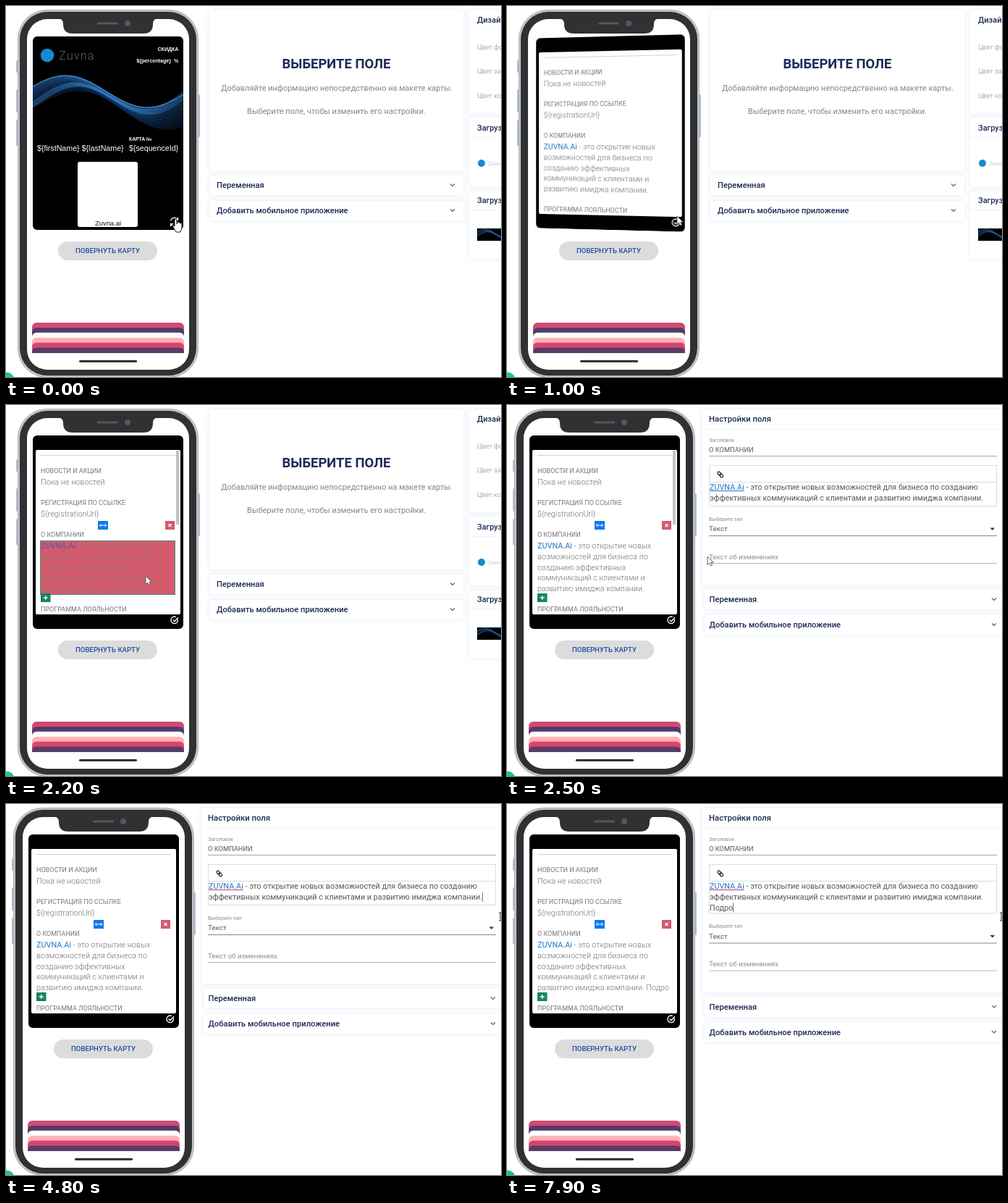
Animation of 684 by 512 pixels, one loop 8 s. Source, as an HTML page:

```html
<!DOCTYPE html>
<html lang="ru">
<head>
<meta charset="utf-8">
<title>Редактор карты</title>
<style>
html, body { margin: 0; width: 100%; height: 100%; overflow: hidden; background: #fff; }
#stage { position: relative; width: 684px; height: 512px; overflow: hidden; background: #fff; }
#stage svg { position: absolute; left: 0; top: 0; display: block; }
#phone { position: absolute; left: 0; top: 0; width: 684px; height: 512px; }
#scene { position: absolute; left: 37px; top: 42px; width: 208px; height: 267px; perspective: 800px; }
#flip { position: absolute; width: 208px; height: 267px; transform-style: preserve-3d; }
.face { position: absolute; width: 208px; height: 267px; backface-visibility: hidden; }
#back { transform: rotateY(180deg); }
text { white-space: pre; font-family: Roboto, "Open Sans", sans-serif; }
.arial { font-family: "Liberation Sans", Arial, sans-serif; }
.panel { fill: #fff; filter: drop-shadow(0 0 3px #e3e8f5); }
</style>
</head>
<body>
<div id="stage"></div>
<script>
const LOOP = 8000;
const BRAND = "Zuvna";
const NAVY = "#1d2b57", GREY = "#85858d", BLUE = "#1f78c8", BODY = "#727278";

// Text is placed by the vertical middle of its capitals.
const text = (x, mid, size, str, o = {}) =>
  `<text x="${x}" y="${(mid + size * 0.36).toFixed(2)}" font-size="${size}"
    font-weight="${o.w || 400}" fill="${o.c || GREY}" text-anchor="${o.a || "start"}"
    class="${o.k || ""}" ${o.id ? `id="${o.id}"` : ""}>${str}</text>`;
const rect = (x, y, w, h, fill, r = 0, extra = "") =>
  `<rect x="${x}" y="${y}" width="${w}" height="${h}" rx="${r}" fill="${fill}" ${extra}/>`;
const panel = (x, y, w, h) => `<rect class="panel" x="${x}" y="${y}" width="${w}" height="${h}" rx="2"/>`;
const path = (d, stroke, width = 1, extra = "") =>
  `<path d="${d}" fill="none" stroke="${stroke}" stroke-width="${width}" ${extra}/>`;
const rule = (x1, x2, y, color) => path(`M${x1} ${y}H${x2}`, color);
const svg = (body, box = "0 0 684 512") => {
  const [, , w, h] = box.split(" ");
  return `<svg width="${w}" height="${h}" viewBox="${box}">${body}</svg>`;
};
const chevron = (x, y) => path(`M${x - 3} ${y - 1.5}l3 3l3 -3`, "#555b70", 1.1);
const row = (x, y, w, label, labelX, chevX) =>
  panel(x, y, w, 27) + text(labelX, y + 13.3, 11.2, label, { w: 500, c: NAVY }) + chevron(chevX, y + 13);

// A ribbon of strands; s runs from its upper edge (0) to its lower edge (1).
function wave() {
  const strand = (sAt, color, width, opacity) => {
    let d = "";
    for (let x = 37; x <= 245; x += 4) {
      const u = (x - 37) / 208, s = sAt(u);
      const y = 118 - 22 * Math.sin(2 * Math.PI * (u * 0.92 + 0.05 - 0.1 * s)) + s * 16 * (1 + u);
      d += (d ? "L" : "M") + x + " " + y.toFixed(1);
    }
    return path(d, color, width, `opacity="${opacity}"`);
  };
  let out = "";
  for (let k = 0; k < 24; k++) {
    const s = k / 23;
    out += strand(() => s, `rgb(${40 - 20 * s},${115 - 55 * s},${190 - 70 * s})`, 1, 0.75 - 0.35 * s);
  }
  for (let k = 0; k < 5; k++) out += strand(u => 0.95 - k * 0.06 - 0.8 * u, "#3d8fd6", 0.9, 0.7);
  return `<g id="wave">${out}${strand(() => 0, "#5aa9e6", 1, 0.9)}</g>`;
}

function phoneBody() {
  const bands = ["#d14a72", "#563a68", "#ffffff", "#ffb3b7", "#d5466f", "#5a3b68"];
  return svg(
    [[14, 75, 17], [14, 115, 32], [14, 157, 36], [264, 122, 59]]
      .map(([x, y, h]) => rect(x, y, 4, h, "#b4bcc6", 1.5)).join("") +
    rect(16.5, 5.5, 249, 507, "#c0c5cb", 40, 'stroke="#a9b0b8"') +
    rect(19, 8, 244, 502, "#303133", 38) +
    rect(29, 18, 224, 484, "#fff", 28) +
    `<path d="M73 17.5Q79 18 79 25Q79 38 92 38H190Q203 38 203 25Q203 18 209 17.5Z" fill="#303133"/>` +
    rect(126, 22.5, 29, 3, "#55575b", 1.5) +
    `<circle cx="168" cy="24" r="4" fill="#55565f"/>` +
    rect(72, 325, 137, 26, "#dcdcdd", 13) +
    text(140.5, 338, 9.6, "ПОВЕРНУТЬ КАРТУ", { w: 500, c: "#1f4c9b", a: "middle" }) +
    `<clipPath id="wallet"><rect x="36" y="437" width="210" height="42"/></clipPath><g clip-path="url(#wallet)">` +
    bands.map((c, i) => rect(36, 437 + i * 6.9, 210, 60, c, 6)).join("") + "</g>" +
    rect(101, 488.7, 80, 3, "#2a2a2c", 1.5));
}

function cardFront() {
  const white = { c: "#fff", k: "arial" };
  return svg(
    rect(37, 42, 208, 267, "#000", 6) +
    `<circle cx="57" cy="68" r="9.3" fill="#1689d3"/>` +
    `<g letter-spacing="1">${text(73, 68.5, 16.5, BRAND, { w: 300, c: "#56636d" })}</g>` +
    text(238.5, 59.5, 7.1, "СКИДКА", { ...white, a: "end", w: 700 }) +
    text(238.5, 75.5, 7.2, "${percentage}  %", { ...white, a: "end", w: 700 }) +
    wave() +
    text(170, 184, 6.8, "КАРТА №", { ...white, w: 700 }) +
    text(43, 196.5, 10.67, "${firstName} ${lastName}", white) +
    text(170, 196.5, 10.67, "${sequenceId}", white) +
    rect(99, 215, 83, 90, "#fff", 3) +
    text(141, 299.5, 9.4, BRAND + ".ai", { c: "#111", a: "middle", k: "arial" }) +
    path("M227.6 296.5a5.2 5.2 0 0 1 9.6 -1.5M237.5 291.8v3.5h-3.5M237.4 299.5a5.2 5.2 0 0 1 -9.6 1.5M227.5 304.2v-3.5h3.5", "#fff", 1.2),
    "37 42 208 267");
}

function cardBack() {
  const lines = ["возможностей для бизнеса по", "созданию эффективных", "коммуникаций с клиентами и"];
  const size = 10.85, body = { w: 300, c: BODY }, head = { c: "#77777b" };
  const link = `<tspan id="cardLink" fill="${BLUE}" font-weight="400">${BRAND.toUpperCase()}.Ai</tspan>`;
  return svg(
    rect(37, 42, 208, 267, "#000", 6) +
    rect(41, 62, 200, 227, "#fff", 2) +
    `<clipPath id="page"><rect x="41" y="62" width="200" height="227"/></clipPath><g clip-path="url(#page)">` +
    rule(48, 234, 69.5, "#d3d3d6") +
    text(48, 90.7, 9, "НОВОСТИ И АКЦИИ", head) +
    text(48, 106.2, size, "Пока не новостей", body) +
    text(48, 134.5, 9, "РЕГИСТРАЦИЯ ПО ССЫЛКЕ", head) +
    text(48, 150.2, size, "${registrationUrl}", body) +
    text(48, 178.8, 9, "О КОМПАНИИ", head) +
    rect(47.5, 187.5, 186, 74, "#d45a6e", 0, 'id="hover" stroke="#3d8f7c"') +
    `<g id="about">` +
    text(48, 194.2, size, link + " - это открытие новых", body) +
    lines.map((s, i) => text(48, 209 + i * 14.7, size, s, body)).join("") +
    text(48, 253.1, size, "", { ...body, id: "cardLast" }) + "</g>" +
    text(48, 281.5, 9, "ПРОГРАММА ЛОЯЛЬНОСТИ", head) +
    rect(235, 63, 4, 102, "#c2c2c4", 1, 'id="scroll"') + "</g>" +
    `<g id="tools">` +
    rect(127, 160, 14, 12, "#0d7af0") + path("M129.5 166h9M131.5 164l-2 2l2 2M136.5 164l2 2l-2 2", "#fff", 1) +
    rect(220, 160, 13, 12, "#d25a72") + path("M224.5 164l4 4M228.5 164l-4 4", "#fff", 1.2) +
    rect(48, 260, 13.5, 12, "#15845c") + path("M51.7 266h6M54.7 263v6", "#fff", 1.3) + "</g>" +
    path("M237.3 295.5a4.8 4.8 0 1 1 -2.5 -3M230.7 296.5l2.2 2.2l5 -5.5", "#fff", 1.3),
    "37 42 208 267");
}

function pickView() {
  const side = { c: GREY, w: 300 }, title = { w: 500, c: NAVY };
  return `<g id="pick">` +
    panel(281, 6, 351, 221) +
    text(456.5, 79, 18.5, "ВЫБЕРИТЕ ПОЛЕ", { w: 700, c: NAVY, a: "middle" }) +
    text(457, 113.5, 11, "Добавляйте информацию непосредственно на макете карты.", { a: "middle" }) +
    text(456.5, 145.5, 11, "Выберите поле, чтобы изменить его настройки.", { a: "middle" }) +
    row(281, 234, 351, "Переменная", 291, 617) +
    row(281, 269, 351, "Добавить мобильное приложение", 291, 617) +
    panel(640, 6, 60, 142) + panel(640, 154, 60, 95) + panel(640, 256, 60, 93) +
    text(651, 19, 11, "Дизайн карты", title) +
    ["фона", "заголовка", "контента"].map((s, i) => text(651, 56.5 + i * 33.5, 9.2, "Цвет " + s, side)).join("") +
    text(651, 168, 11, "Загрузить логотип", title) + rule(640, 684, 181.5, "#f0f1f6") +
    text(651, 268, 11, "Загрузить фон", title) + rule(640, 684, 281.5, "#f0f1f6") +
    `<circle cx="657" cy="217" r="5" fill="#1689d3"/>` +
    text(666, 217, 8, BRAND, { w: 300, c: "#8db4c8" }) +
    rect(651, 307, 50, 17, "#000") +
    `<use href="#wave" transform="translate(642 285) scale(.24)"/></g>`;
}

function editView() {
  const ink = { c: "#58585c" }, hint = { c: "#8c8c92" };
  const link = `<tspan id="editLink" fill="${BLUE}">${BRAND.toUpperCase()}.Ai</tspan>`;
  return `<g id="edit">` +
    `<rect id="form" class="panel" x="270" y="6" width="420" height="242"/>` +
    text(279, 18.8, 11.3, "Настройки поля", { w: 500, c: NAVY }) +
    rule(270, 684, 33.5, "#f5f6fa") +
    text(279, 48, 7.1, "Заголовок", hint) +
    text(279, 61.2, 9.3, "О КОМПАНИИ", ink) +
    rule(279, 677, 70.5, "#a5a5a8") +
    rect(279.5, 83.5, 397, 56, "#fff", 0, 'id="box" stroke="#dcdcde"') +
    rule(280, 677, 106.5, "#dadadc") +
    `<g transform="rotate(45 294.5 96)" fill="none" stroke="#333" stroke-width="1.3">
      <rect x="290" y="94" width="5.5" height="3.6" rx="1.8"/><rect x="293.8" y="94" width="5.5" height="3.6" rx="1.8"/></g>` +
    text(280, 113.4, 10.82, link + " - это открытие новых возможностей для бизнеса по созданию", ink) +
    path("", BLUE, 1, 'id="underline"') +
    text(280, 128.1, 10.82, "", { ...ink, id: "line2" }) +
    text(280, 142.8, 10.82, "", { ...ink, id: "line3" }) +
    rect(0, 0, 1, 13, "#777", 0, 'id="caret"') +
    `<g id="lower">` +
    text(279, 157.3, 7.2, "Выберите тип", hint) +
    text(279, 170.7, 9.9, "Текст", ink) +
    `<path d="M667.5 169.5h6.5l-3.2 3.5z" fill="#333"/>` +
    rule(279, 677, 180.5, "#88888c") +
    text(279, 209.3, 9.7, "Текст об изменениях", hint) +
    rule(279, 677, 218.5, "#b5b5b8") +
    row(273, 255, 420, "Переменная", 279.5, 673) +
    row(273, 290, 420, "Добавить мобильное приложение", 279.5, 673) + "</g></g>";
}

const pointer = `<g id="cursor">
  <path id="hand" d="M-2 2Q-1 0 1 2V8L2 5Q3 4 4 6Q5 5 6 7Q8 6 8 8V13L6 19H0L-4 12Q-5 9 -2 11Z" fill="#fff" stroke="#222"/>
  <path id="arrow" d="M0 0V11.5L2.7 9L4.6 13L6.6 12L4.8 8.2H8.2Z" fill="#fff" stroke="#555" stroke-width=".9"/>
  <path id="beam" d="M-2 0H2M0 0V11M-2 11H2" fill="none" stroke="#333"/></g>`;

const stage = document.getElementById("stage");
stage.innerHTML =
  svg(pickView() + editView()) +
  `<div id="phone">${phoneBody()}<div id="scene"><div id="flip">
    <div class="face" id="front">${cardFront()}</div><div class="face" id="back">${cardBack()}</div>
  </div></div></div>` +
  svg(`<circle cx="1" cy="516" r="10.5" fill="#17c890"/>` + pointer);

const el = {};
stage.querySelectorAll("[id]").forEach(n => el[n.id] = n);
const show = (node, on) => node.style.display = on ? "" : "none";

const FLIP = { start: 420, length: 800 };
const EDIT_AT = 2300, WRAP_AT = 7400;
const moves = [[0, 235, 293], [600, 235, 290], [1300, 235, 290], [1700, 203, 246], [2200, 193, 236],
  [2500, 277, 209], [3300, 500, 165], [3900, 657, 126], [4050, 657, 126], [4300, 683, 150]];
const typing = [[0, ""], [5100, " "], [6200, " П"], [6500, " По"], [7400, " Под"], [7600, " Подр"], [7800, " Подро"]];
const caretOn = [[3750, 4300], [4800, 5600], [6200, 7200], [7400, LOOP]];

// The CSS "ease" curve, solved by bisection.
function ease(x) {
  const bez = (a, b, p) => 3 * a * p * (1 - p) ** 2 + 3 * b * p * p * (1 - p) + p ** 3;
  let lo = 0, hi = 1;
  for (let i = 0; i < 20; i++) {
    const mid = (lo + hi) / 2;
    if (bez(0.25, 0.25, mid) < x) lo = mid; else hi = mid;
  }
  return bez(0.1, 1, lo);
}

function position(t) {
  const i = moves.findIndex(m => m[0] > t);
  if (i < 0) return moves[moves.length - 1].slice(1);
  const [t0, x0, y0] = moves[i - 1], [t1, x1, y1] = moves[i];
  const p = (t - t0) / (t1 - t0), s = p * p * (3 - 2 * p);
  return [x0 + (x1 - x0) * s, y0 + (y1 - y0) * s];
}

function draw(t) {
  const editing = t >= EDIT_AT, wrapped = t >= WRAP_AT;

  const p = Math.min(1, Math.max(0, (t - FLIP.start) / FLIP.length));
  const flat = p === 0 || p === 1;
  el.flip.style.transform = flat ? "none" : `rotateY(${180 * ease(p)}deg)`;
  el.back.style.transform = flat ? "none" : "";
  show(el.front, p < 1);
  show(el.back, p > 0);
  el.phone.style.transform = editing ? "translateX(-6px)" : "none";
  show(el.pick, !editing);
  show(el.edit, editing);

  const hovered = t >= 1500 && !editing;
  show(el.hover, hovered);
  show(el.tools, t >= 1500);
  show(el.scroll, t >= 1400 && t < 3300);
  el.about.querySelectorAll("text").forEach(n => n.setAttribute("fill", hovered ? "#9c7676" : BODY));
  el.cardLink.setAttribute("fill", hovered ? "#4a5c9c" : BLUE);

  const typed = typing.filter(k => k[0] <= t).pop()[1];
  el.cardLast.textContent = "развитию имиджа компании." + typed;
  el.line2.textContent = "эффективных коммуникаций с клиентами и развитию имиджа компании." + (wrapped ? "" : typed);
  el.line3.textContent = wrapped ? typed.trim() : "";

  const drop = wrapped ? 11.5 : 0;
  el.lower.setAttribute("transform", `translate(0 ${drop})`);
  el.box.setAttribute("height", 56 + drop);
  el.form.setAttribute("height", 242 + drop);
  if (editing) {
    const line = wrapped ? el.line3 : el.line2;
    el.caret.setAttribute("x", Math.round(280 + line.getComputedTextLength()));
    el.caret.setAttribute("y", wrapped ? 136.5 : 122);
    el.underline.setAttribute("d", `M280 118.5h${el.editLink.getComputedTextLength()}`);
    el.underline.setAttribute("stroke", t >= 4200 ? "#b8406a" : BLUE);
  }
  show(el.caret, caretOn.some(([a, b]) => t >= a && t < b));

  const [x, y] = position(t);
  el.cursor.setAttribute("transform", `translate(${x.toFixed(1)} ${y.toFixed(1)})`);
  show(el.hand, t < 600);
  show(el.arrow, t >= 600 && t < 3600);
  show(el.beam, t >= 3600);
}

const origin = performance.now();
function tick() {
  draw((performance.now() - origin) % LOOP);
  requestAnimationFrame(tick);
}
tick();
</script>
</body>
</html>
```
